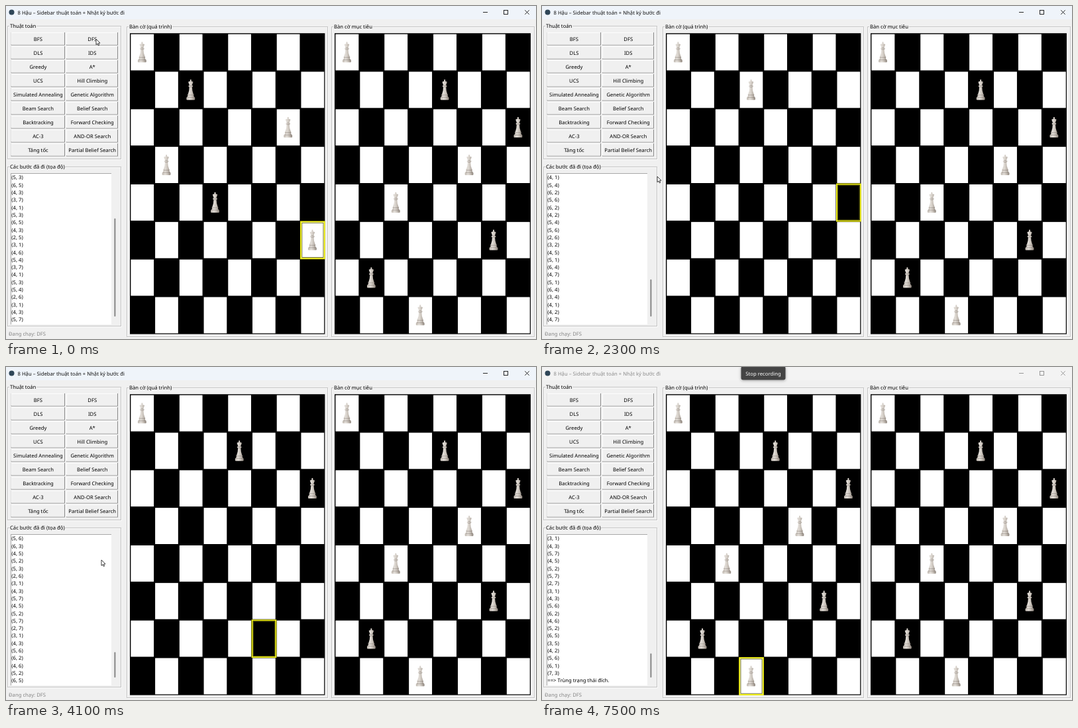
Animation of 800 by 504 pixels, one loop 7.6 s. Source, as an HTML page with a canvas:

```html
<!DOCTYPE html>
<html lang="vi">
<head>
<meta charset="utf-8">
<title>8 Hậu</title>
<style>
html, body { margin: 0; width: 100%; height: 100%; overflow: hidden; background: #f0f0f0; }
canvas { display: block; }
</style>
</head>
<body>
<canvas id="stage" width="800" height="504"></canvas>
<script>
const ctx = document.getElementById('stage').getContext('2d');
const LOOP = 7600, FRAME = 100, LINES = 20;
const FONT = '7.7px "Noto Sans", "Open Sans", sans-serif';
const DONE = '==> Trùng trạng thái đích.';

const BUTTONS = [
  'BFS', 'DFS', 'DLS', 'IDS', 'Greedy', 'A*', 'UCS', 'Hill Climbing',
  'Simulated Annealing', 'Genetic Algorithm', 'Beam Search', 'Belief Search',
  'Backtracking', 'Forward Checking', 'AC-3', 'AND-OR Search',
  'Tăng tốc', 'Partial Belief Search'
];

// Depth-first search: every safe placement is one step
const steps = [];
function search(path) {
  const row = path.length;
  if (row === 8) return true;
  for (let col = 0; col < 8; col++) {
    if (path.some((c, r) => c === col || Math.abs(c - col) === row - r)) continue;
    const next = [...path, col];
    steps.push(next);
    if (search(next)) return true;
  }
  return false;
}
search([]);
const goal = steps[steps.length - 1];
const log = steps.map(p => `(${p.length - 1}, ${p[p.length - 1]})`).concat(DONE);

// [time, steps done]; the fraction is progress in redrawing the queens
const PROGRESS = [[0, 28.8], [1300, 55.8], [2300, 74.25], [3100, 89.4], [4100, 108.27], [4405, 114]];
// [time, x, y] of the pointer tip
const POINTER = [[0, 136, 50], [1600, 136, 50], [2300, 174, 258], [2800, 145, 292], [3100, 145, 292],
  [4100, 144, 292], [5000, 142, 287], [6300, 142, 287], [6900, 334, -20]];

function along(keys, t) {
  let i = 0;
  while (i < keys.length - 1 && t >= keys[i + 1][0]) i++;
  const a = keys[i], b = keys[i + 1];
  if (!b) return a.slice(1);
  const k = (t - a[0]) / (b[0] - a[0]);
  return a.slice(1).map((v, j) => v + (b[j + 1] - v) * k);
}

function rect(x, y, w, h, color) {
  ctx.fillStyle = color;
  ctx.fillRect(x, y, w, h);
}

function frame(x, y, w, h, color, width = 1) {
  ctx.strokeStyle = color;
  ctx.lineWidth = width;
  ctx.strokeRect(x, y, w, h);
}

function text(s, x, y, color = '#000', align = 'left') {
  ctx.font = FONT;
  ctx.textAlign = align;
  ctx.fillStyle = color;
  ctx.fillText(s, x, y);
}

function lines(points, color, width = 1) {
  ctx.strokeStyle = color;
  ctx.lineWidth = width;
  ctx.beginPath();
  for (const [x1, y1, x2, y2] of points) {
    ctx.moveTo(x1, y1);
    ctx.lineTo(x2, y2);
  }
  ctx.stroke();
}

function group(label, x, y, w, h) {
  frame(x + 1.5, y + 1.5, w, h, '#fcfcfc');
  frame(x + 0.5, y + 0.5, w, h, '#c4c4c4');
  ctx.font = FONT;
  rect(x + 3, y - 3, ctx.measureText(label).width + 2, 8, '#f0f0f0');
  text(label, x + 4, y + 3);
}

function button(label, x, y, w) {
  rect(x, y, w, 19.5, '#8a8a8a');
  rect(x, y, w - 1, 18.5, '#fdfdfd');
  rect(x + 1, y + 1, w - 2, 17.5, '#f0f0f0');
  text(label, x + w / 2 + 0.2, y + 12.7, '#000', 'center');
}

// y and half width down one side of the piece
const PROFILE = [[0, 0.6], [1.6, 1.2], [2.6, 0.8], [3.6, 3.7], [5, 3.3], [8.8, 1.9], [9.6, 3.3], [10.8, 3.2],
  [11.6, 2.1], [17, 2.6], [22, 4.1], [23.2, 4.9], [24.6, 4.4], [26.4, 5.3], [27.5, 6.4], [30.4, 6.4], [31, 5.6]];

function queen(cx, cy) {
  ctx.save();
  ctx.translate(cx, cy - 15.3);
  const shade = ctx.createLinearGradient(-6, 0, 6, 0);
  shade.addColorStop(0, '#c3bcb4');
  shade.addColorStop(0.35, '#e2ddd7');
  shade.addColorStop(0.65, '#c9c2ba');
  shade.addColorStop(1, '#938a82');
  ctx.fillStyle = shade;
  ctx.beginPath();
  for (const [y, r] of PROFILE) ctx.lineTo(-r, y);
  for (const [y, r] of [...PROFILE].reverse()) ctx.lineTo(r, y);
  ctx.fill();
  lines([[-2, 9.2, 2, 9.2], [-2.2, 11.5, 2.2, 11.5], [-4.2, 23.6, 4.2, 23.6], [-5, 27.2, 5, 27.2]],
    'rgba(95,85,78,0.5)', 0.7);
  ctx.restore();
}

function board(x, y, cw, ch, path, shown, mark) {
  rect(x, y, cw * 8 + 0.6, ch * 8 + 0.6, '#000');
  for (let r = 0; r < 8; r++)
    for (let c = r % 2; c < 8; c += 2)
      rect(x + c * cw + 1.4, y + r * ch + 1.4, cw - 2, ch - 2, '#fff');
  if (mark) {
    const r = path.length - 1, c = path[r];
    const mx = x + c * cw, my = y + r * ch;
    frame(mx + 1, my + 1, cw - 1, ch - 1, '#f2f218', 2);
    frame(mx + 2.8, my + 2.8, cw - 4.6, ch - 4.6, '#55550a', 0.8);
  }
  path.slice(0, shown).forEach((c, r) => queen(x + (c + 0.5) * cw, y + (r + 0.5) * ch));
}

function titleBar(active) {
  rect(0, 0, 800, 20, active ? '#eff4fa' : '#f3f3f3');
  const ink = active ? '#111' : '#8c8c8c';
  ctx.fillStyle = '#2f4658';
  ctx.beginPath();
  ctx.arc(8.5, 9.5, 4, 0, 7);
  ctx.fill();
  text('8 Hậu – Sidebar thuật toán + Nhật ký bước đi', 17.5, 12.8, ink);
  lines([[720, 9.5, 727, 9.5], [783.3, 6.3, 789.7, 12.7], [783.3, 12.7, 789.7, 6.3]], ink, 0.9);
  frame(751.5, 6.5, 6, 6, ink, 0.9);
}

function sidebar(count) {
  group('Thuật toán', 2, 30, 171, 201);
  BUTTONS.forEach((label, i) => {
    const right = i % 2;
    button(label, right ? 91 : 7.5, 40 + 21 * (i >> 1), right ? 78 : 81.5);
  });

  group('Các bước đã đi (tọa độ)', 2, 243, 171, 241);
  rect(7, 253, 152, 229, '#a8a8a8');
  rect(8, 254, 151, 228, '#fff');
  log.slice(Math.max(0, count - LINES), count)
    .forEach((s, i) => text(s, 8.3, 262.3 + i * 11.32));

  const thumb = 208 * LINES / count;
  ctx.fillStyle = '#858585';
  ctx.beginPath();
  ctx.roundRect(163.4, 470 - thumb, 2, thumb, 1);
  ctx.fill();

  text('Đang chạy: DFS', 4, 499.3, '#858585');
}

function pointer(x, y) {
  ctx.beginPath();
  for (const [px, py] of [[0, 0], [0, 8.6], [2, 6.9], [3.3, 9.8], [4.7, 9.2], [3.4, 6.3], [6, 6.1]])
    ctx.lineTo(x + px, y + py);
  ctx.closePath();
  ctx.fillStyle = '#fff';
  ctx.fill();
  ctx.strokeStyle = '#111';
  ctx.lineWidth = 0.8;
  ctx.stroke();
}

function tooltip() {
  ctx.save();
  ctx.shadowColor = 'rgba(0,0,0,0.35)';
  ctx.shadowBlur = 4;
  ctx.shadowOffsetY = 1;
  ctx.fillStyle = '#444';
  ctx.beginPath();
  ctx.roundRect(300.5, -1, 67, 20.5, 3);
  ctx.fill();
  ctx.restore();
  text('Stop recording', 334, 12.6, '#fff', 'center');
}

function draw(t) {
  const [progress] = along(PROGRESS, t);
  const count = Math.min(log.length, Math.floor(progress));
  const path = steps[Math.min(count, steps.length) - 1];
  const part = count === log.length ? 1 : progress % 1;
  const shown = Math.floor(part / 0.6 * (path.length + 1));

  rect(0, 0, 800, 504, '#f0f0f0');
  titleBar(t < 7400);
  sidebar(count);
  group('Bàn cờ (quá trình)', 182, 31, 303, 469);
  group('Bàn cờ mục tiêu', 491, 31, 306, 469);
  board(187, 41.2, 36.72, 56.85, path, shown, true);
  board(496, 41.2, 36.92, 56.85, goal, 8, false);
  pointer(...along(POINTER, t));
  if (t >= 7000) tooltip();
}

ctx.textRendering = 'geometricPrecision';
const start = performance.now();
function tick() {
  const t = (performance.now() - start + 8) % LOOP;
  draw(Math.floor(t / FRAME) * FRAME);
  requestAnimationFrame(tick);
}
tick();
</script>
</body>
</html>
```
